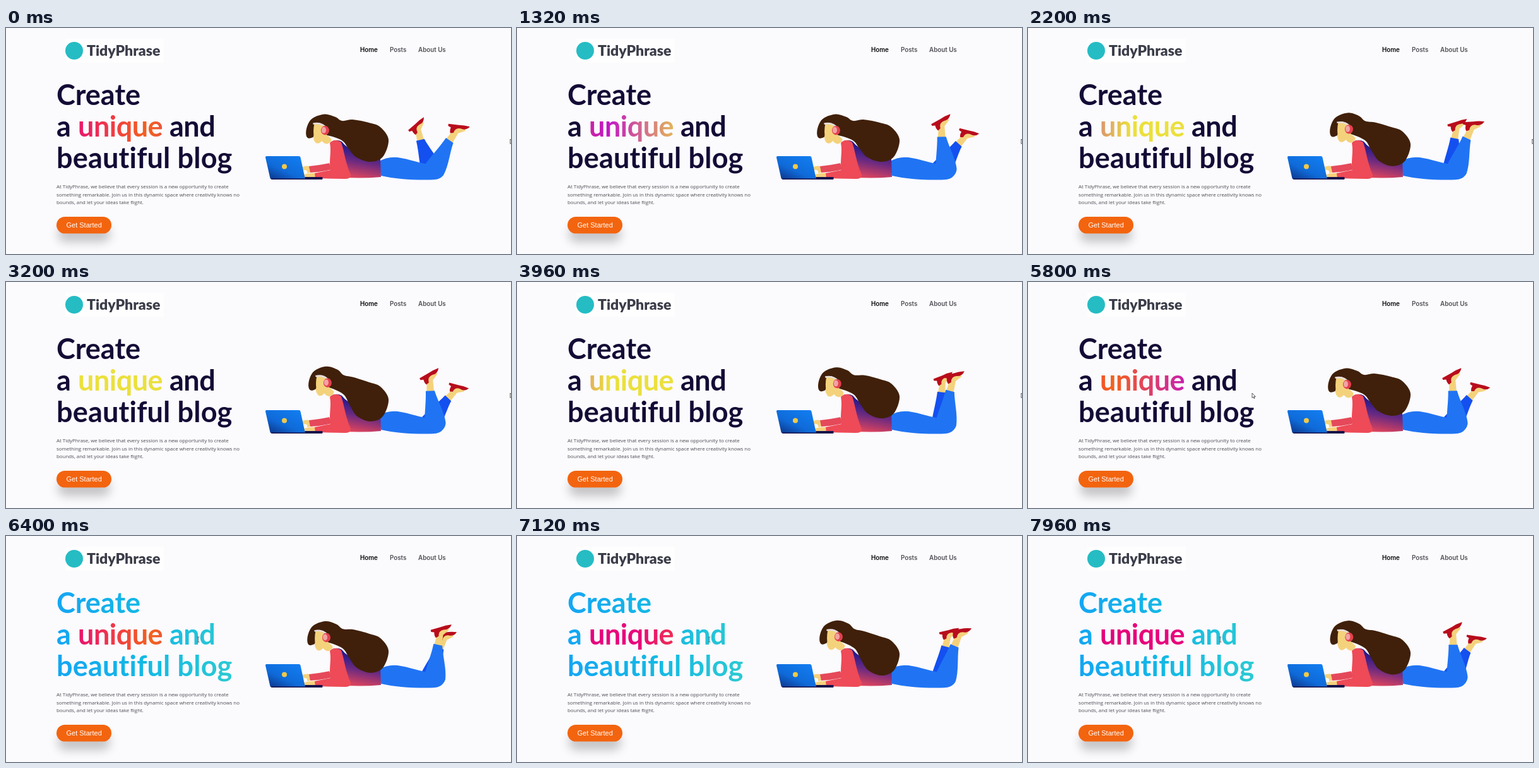
Animation, 800 px wide and 358 px high, one loop 8000 ms. Source, as an HTML page:

```html
<!DOCTYPE html>
<html lang="en">
<head>
<meta charset="utf-8">
<title>Blog landing page</title>
<style>
  html, body { margin: 0; width: 100%; height: 100%; overflow: hidden; background: #fbfafd; }
  svg { display: block; width: 100%; height: 100%; }
  text { white-space: pre; font-variant-ligatures: none; }
  .brand { font: 900 23px Lato, sans-serif; fill: #3b3d49; }
  .nav { font: 600 9.8px Inter, sans-serif; fill: #505056; }
  .nav .current { fill: #0a0a0c; }
  .title { font: 700 45px Lato, sans-serif; fill: #140c36; }
  .title .word { fill: url(#word); }
  .copy { font: 400 7.9px "Open Sans", sans-serif; fill: #4c4c52; }
  .button { font: 400 11px "Liberation Sans", Arial, sans-serif; fill: #fff; }
</style>
</head>
<body>
<svg viewBox="0 0 800 358" preserveAspectRatio="none">
  <defs>
    <linearGradient id="word" gradientUnits="userSpaceOnUse" x1="114" x2="779" y1="0" y2="0"></linearGradient>
    <linearGradient id="hover" gradientUnits="userSpaceOnUse" x1="80" x2="360" y1="0" y2="0">
      <stop stop-color="#14a6f3"/><stop offset=".5" stop-color="#13b9e4"/><stop offset="1" stop-color="#2ccad3"/>
    </linearGradient>
    <linearGradient id="screen" x1="0" y1="1" x2=".8" y2="0">
      <stop stop-color="#0b2f80"/><stop offset=".45" stop-color="#0f6ad8"/><stop offset="1" stop-color="#127df0"/>
    </linearGradient>
    <linearGradient id="shirt" x1=".6" y1="0" x2=".35" y2="1">
      <stop offset=".2" stop-color="#241a8c"/><stop offset=".55" stop-color="#6b2a80"/><stop offset="1" stop-color="#e8465a"/>
    </linearGradient>
    <filter id="soft" x="-40%" y="-150%" width="180%" height="400%"><feGaussianBlur stdDeviation="8"/></filter>
    <g id="foot">
      <path fill="#f4d27c" d="M-8-48L-6-64-10-71 8-81 12-76 4-67 4-48Z"/>
      <path fill="#b80d1c" transform="translate(0 -75) rotate(-38)"
        d="M18 1Q9-3 1-4L-15-8-16-5-12-2Q-15 3-14 7L-9 7Q-5-1 3 2 11 7 18 1Z"/>
    </g>
    <path id="shin" d="M-16.500 5C-15-14-10-34-9-51L5-50C8-34 17-15 17.500 2A17.500 17.500 0 0 1-16.500 5Z"/>
  </defs>

  <rect width="800" height="358" fill="#fbfafd"/>
  <rect x="94" y="17" width="156" height="38" fill="#fefefe"/>
  <circle cx="108" cy="36" r="14" fill="#25bcc4"/>
  <text class="brand" x="128" y="43.5">TidyPhrase</text>
  <g class="nav">
    <text class="current" x="561" y="37.5">Home</text>
    <text x="608" y="37.5">Posts</text>
    <text x="653" y="37.5">About Us</text>
  </g>

  <g class="title" id="title">
    <text x="80" y="122">Create</text>
    <text x="80" y="172">a</text>
    <text class="word" x="114" y="172" letter-spacing="-.5">unique</text>
    <text x="259" y="172" letter-spacing="-.5">and</text>
    <text x="80" y="222" letter-spacing=".2">beautiful blog</text>
  </g>

  <g class="copy">
    <text x="80" y="254">At TidyPhrase, we believe that every session is a new opportunity to create</text>
    <text x="80" y="266.5">something remarkable. Join us in this dynamic space where creativity knows no</text>
    <text x="80" y="279">bounds, and let your ideas take flight.</text>
  </g>
  <rect x="82" y="314" width="83" height="25" rx="12" opacity=".22" filter="url(#soft)"/>
  <rect x="80" y="299" width="87" height="26.5" rx="13.2" fill="#f3640f"/>
  <text class="button" x="95.5" y="316">Get Started</text>

  <g id="backLeg"><use href="#foot"/><use href="#shin" fill="#1450f0"/></g>
  <g id="frontLeg"><use href="#foot"/><use href="#shin" fill="#2074f3"/></g>
  <path fill="#2074f3" d="M590 212Q606 202 626 206C648 210 662 217 682 217L690 236Q684 240.500 672 240.500C642 241 616 239 594 234Z"/>

  <path fill="url(#shirt)" d="M514 181Q523 175 532 180 546 199 593 206L594 236Q560 239 528 236Z"/>
  <path fill="#f4d27c" d="M469 220Q477 217 485 220L486 228 477 230Q479 224 469 225ZM466 235Q476 229 494 230L496 238 474 238Z"/>
  <path fill="#e5495a" d="M480 219Q498 217 512 214L516 224Q500 228 482 229Z"/>
  <path fill="#ee4a57" d="M513 182Q521 174 531 181C536 195 537 212 546 232Q547 239 537 239L490 238 489 230 514 225C511 211 516 196 513 182Z"/>

  <path id="hair" fill="#40200a"/>
  <g id="face">
    <path fill="#f4d27c" d="M488 152Q496 148 501 154L506 168 515 176Q516 181 508 184 502 183 500 179 495 185 490 182 485 176 487 170 486 160 488 152Z"/>
    <path fill="none" stroke="#e6dcdc" stroke-width="2.600" d="M486 152Q500 149 508 160"/>
    <ellipse cx="505" cy="162.500" rx="6.500" ry="7.200" fill="#e5404f"/>
    <ellipse cx="503" cy="162" rx="3.600" ry="5" fill="#f1a3a4"/>
  </g>

  <path fill="url(#screen)" d="M412.500 203H464Q466 203 466.500 205L474 239.500H421Q419 239.500 418.500 238L411 205Q411 203 412.500 203Z"/>
  <path fill="#15104a" d="M473 236H501Q502.500 238 501 240H420L421 238.500H474Z"/>
  <circle cx="441" cy="219.500" r="4" fill="#f0c94a"/>

  <path id="arrow" fill="#fff" stroke="#333" stroke-width=".8" d="M0 0V7.500L1.800 6 3 8.600 4.200 8 3.100 5.500H5.300Z"/>
  <path id="beam" fill="none" stroke="#555" stroke-width=".8" d="M-1.500-4H2.500M.500-4V4M-1.500 4H2.500"/>
</svg>
<script>
const LOOP = 8000, SWING = 4480, HOVER_AT = 6000;
const { PI, sin, cos, min, max } = Math;
const $ = id => document.getElementById(id);
const mix = (a, b, k) => a + (b - a) * k;
const ease = k => (1 - cos(PI * k)) / 2;
const progress = (t, from, to) => min(1, max(0, (t - from) / (to - from)));
const place = (id, value) => $(id).setAttribute("transform", value);

// The gradient is five words wide
const COLORS = ["#e4007b", "#e8077c", "#f4621c", "#c014c6", "#ebe03c", "#ebe03c"];
$("word").innerHTML = COLORS.map((color, i) =>
  `<stop offset="${i / 5}" stop-color="${color}"/>`).join("");

// Turning points of each shin: time, angle
const FRONT = [[500, 39], [1450, -7], [2400, 24], [3250, -6]];
const BACK = [[0, -17], [1450, 39], [2400, 3], [3200, 39]];

function swingAngle(turns, t) {
  const [first] = turns;
  if (t < first[0]) t += SWING;
  const keys = [...turns, [first[0] + SWING, first[1]]];
  const i = keys.findIndex(key => key[0] > t);
  const [from, a] = keys[i - 1], [to, b] = keys[i];
  return mix(a, b, ease(progress(t, from, to)));
}

const HAIR = [[475, 163], [483, 145], [503, 137], [521, 141], [532, 147], [550, 144.5],
  [575, 149], [593, 156], [606, 176], [597, 203], [577, 211], [555, 204], [542, 190],
  [530, 177], [500, 169], [479, 175]];

// Raising the head lets the loose end of the hair sink
function hairPoint([x, y], lift) {
  const loose = ease(progress(x, 510, 570));
  return [x + 4 * lift * (1 - loose), y + lift * mix(-3, 9, loose)];
}

// Closed smooth outline through points
function outline(points) {
  const n = points.length, at = i => points[(i + n) % n];
  return "M" + at(0) + points.map((p, i) => {
    const before = at(i - 1), next = at(i + 1), after = at(i + 2);
    const c1 = p.map((v, j) => v + (next[j] - before[j]) / 6);
    const c2 = next.map((v, j) => v - (after[j] - p[j]) / 6);
    return `C${c1} ${c2} ${next}`;
  }).join("") + "Z";
}

function drawPointer(t) {
  const sweep = progress(t, 5300, 5800), settle = progress(t, 5800, 6100);
  const x = mix(798.8, 355, sweep) - 51 * settle;
  const y = 176 + 90 * sin(PI * sweep) - 12 * settle;
  const hovered = t >= HOVER_AT;
  for (const id of ["arrow", "beam"]) place(id, `translate(${x} ${y})`);
  $("arrow").style.display = hovered ? "none" : "";
  $("beam").style.display = hovered ? "" : "none";
  $("title").style.fill = hovered ? "url(#hover)" : "";
}

function draw(now) {
  const t = now % LOOP, swing = t % SWING;

  const shift = 2 * (1 + cos(2 * PI * (t - 3180) / 10000));
  place("word", "");
  $("word").setAttribute("gradientTransform", `translate(${-133 * shift})`);

  place("frontLeg", `translate(679 222.5) rotate(${swingAngle(FRONT, swing)})`);
  place("backLeg", `translate(672 222) rotate(${swingAngle(BACK, swing)}) scale(.94)`);

  const lift = 0.5 - 0.65 * cos(2 * PI * (swing - 660) / SWING);
  place("face", `translate(${4 * lift} ${-2.5 * lift})`);
  $("hair").setAttribute("d", outline(HAIR.map(point => hairPoint(point, lift))));

  drawPointer(t);
}

let start;
function tick(now) {
  start ??= now;
  draw(now - start);
  requestAnimationFrame(tick);
}
draw(0);
requestAnimationFrame(tick);
</script>
</body>
</html>
```
